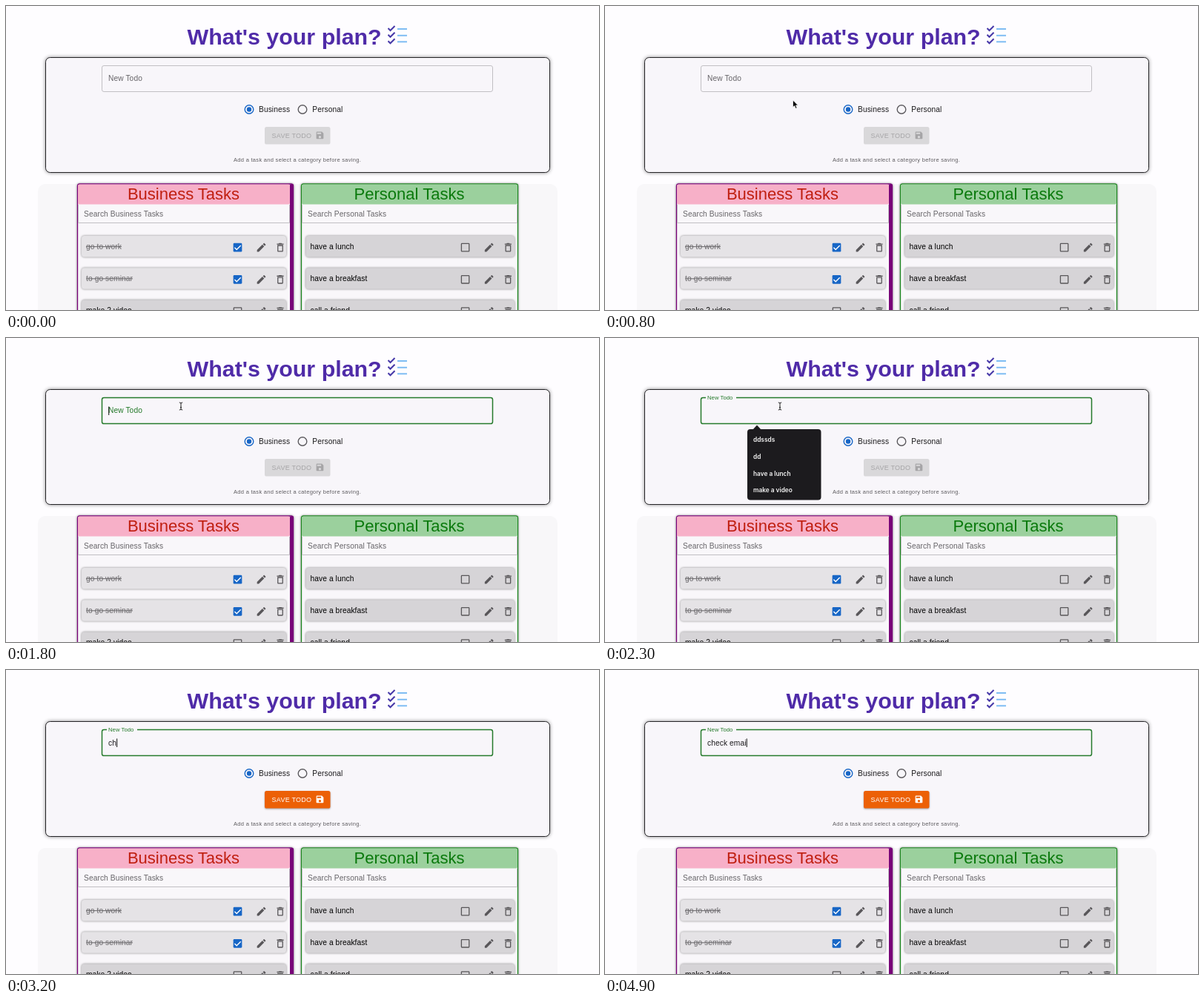
An HTML page for the animation above (5 s loop, 800 px wide and 410 px high).

```html
<!DOCTYPE html>
<html lang="en">
<head>
<meta charset="utf-8">
<title>What's your plan?</title>
<style>
  html, body { margin: 0; width: 100%; height: 100%; overflow: hidden; background: #fefdff; }
  svg { display: block; }
  text { font: 10.2px "Liberation Sans", Arial, sans-serif; letter-spacing: .1px; white-space: pre; }
  .muted { fill: #676569; }
  .title { font-size: 30.4px; font-weight: bold; letter-spacing: 0; fill: #4f2ba8; }
  .heading { font-size: 22px; letter-spacing: 0; text-anchor: middle; }
  .hint { font-size: 7.5px; letter-spacing: .3px; fill: #5f5d61; }
  .button { font-size: 9px; letter-spacing: .25px; }
  .done { fill: #6b696c; text-decoration: line-through; }
  .popup { font: 600 8.3px Inter, sans-serif; letter-spacing: 0; fill: #f4f4f4; }
  .soft { filter: drop-shadow(0 0 2.5px #0007); }
  .card { filter: drop-shadow(0 .6px 1.6px #0007); }
</style>
</head>
<body>
<svg width="800" height="410" viewBox="0 0 800 410">
  <defs>
    <path id="edit" d="M3 17.25V21h3.75L17.81 9.94l-3.75-3.75L3 17.25zM20.71 7.04c.39-.39.39-1.02 0-1.41l-2.34-2.34c-.39-.39-1.02-.39-1.41 0l-1.83 1.83 3.75 3.75 1.83-1.83z"/>
    <path id="bin" d="M6 19c0 1.1.9 2 2 2h8c1.1 0 2-.9 2-2V7H6v12zM8 9h8v10H8V9zm7.5-5l-1-1h-5l-1 1H5v2h14V4z"/>
    <path id="save" d="M17 3H5c-1.11 0-2 .9-2 2v14c0 1.1.89 2 2 2h14c1.1 0 2-.9 2-2V7l-4-4zm-5 16c-1.66 0-3-1.34-3-3s1.34-3 3-3 3 1.34 3 3-1.34 3-3 3zm3-10H5V5h10v4z"/>
    <rect id="empty" x="4" y="4" width="16" height="16" rx="1" fill="none" stroke="#59575a" stroke-width="2"/>
    <g id="checked">
      <rect x="3" y="3" width="18" height="18" rx="2" fill="#1766c6"/>
      <path d="M5.7 12.2l4.3 4.3L18.5 8" fill="none" stroke="#fff" stroke-width="2"/>
    </g>
  </defs>

  <text class="title" x="244.5" y="52">What's your plan?</text>
  <g id="checklist" fill="none" stroke-width="2"></g>

  <rect class="soft" x="53.5" y="69.5" width="680" height="155" rx="6" fill="#f8f6fa" stroke="#252427"/>
  <rect id="field" x="129.5" y="80.5" width="527" height="35" rx="2.6" fill="none"/>
  <rect id="notch" x="136" y="78" height="5" fill="#f8f6fa"/>
  <text id="label">New Todo</text>
  <text id="typed" x="138" y="101.5" fill="#1c1b1d"></text>
  <rect id="caret" y="92.5" width="1" height="11.5" fill="#111"/>

  <g fill="none" stroke-width="1.4">
    <circle cx="328" cy="139.5" r="5.8" stroke="#1766c6"/>
    <circle cx="328" cy="139.5" r="3.2" fill="#1766c6"/>
    <circle cx="400" cy="139.5" r="5.8" stroke="#5d5b5f"/>
  </g>
  <text x="341" y="143" fill="#1c1b1d">Business</text>
  <text x="413.3" y="143" fill="#1c1b1d">Personal</text>

  <rect id="button" x="349" y="163" width="88.5" height="23.5" rx="2.6"/>
  <g id="caption">
    <text class="button" x="358.6" y="178">SAVE TODO</text>
    <use href="#save" transform="translate(417 168) scale(.54)"/>
  </g>
  <text class="hint" x="307" y="210">Add a task and select a category before saving.</text>

  <rect x="43" y="240" width="701" height="190" rx="10" fill="#f8f7f9"/>
  <g id="columns"></g>

  <g id="popup">
    <path d="M199 124l6-6.5 6 6.5z" fill="#1c1b1e"/>
    <rect x="192" y="123" width="99.5" height="95.5" rx="4" fill="#1c1b1e"/>
  </g>
  <path id="arrow" d="M0 0V9.6L2.2 7.6 3.8 11.2 5.5 10.4 3.9 7H6.9Z" fill="#000" stroke="#fff" stroke-width=".7"/>
  <path id="beam" d="M-2.2-5Q0-5 0-3.8Q0-5 2.2-5M0-4V4M-2.2 5Q0 5 0 3.8Q0 5 2.2 5M-1 1.5H1" fill="none" stroke="#222"/>
</svg>

<script>
const LOOP = 5000, STEP = 100;
const FOCUS = 1800, POPUP = 2000, TYPING = 2800;
const KEYS = [2800, 3200, 3400, 3600, 3900, 4000, 4200, 4500, 4700, 4900];
const PHRASE = "check emai";
const PATH = [[100, 24, 382], [600, 225, 165], [800, 253.5, 127], [1100, 252, 122], [1200, 252, 122], [1500, 236, 92]];

const $ = id => document.getElementById(id);
const set = (id, attrs) => { for (const key in attrs) $(id).setAttribute(key, attrs[key]); };
const show = (id, on) => set(id, { visibility: on ? "visible" : "hidden" });
const clamp = v => Math.min(1, Math.max(0, v));
const mix = (a, b, p) => a + (b - a) * p;
const mixColor = (a, b, p) => `rgb(${a.map((v, i) => Math.round(mix(v, b[i], p)))})`;
const icon = (name, cx, cy) => `<use href="#${name}" fill="#59575a" transform="translate(${cx - 7.8} ${cy - 7.8}) scale(.65)"/>`;

function row(x, width, icons, [task, done], i) {
  const y = 310 + i * 43.2;
  return `<rect class="card" x="${x}" y="${y}" width="${width}" height="28.5" rx="4" fill="${done ? "#e5e3e6" : "#d6d4d7"}"/>
    <text class="${done ? "done" : ""}" x="${x + 6}" y="${y + 17.6}">${task}</text>` +
    [done ? "checked" : "empty", "edit", "bin"].map((name, k) => icon(name, icons[k], y + 15.6)).join("");
}

function column({ name, x, width, border, band, ink, edge, cardX, cardWidth, icons, tasks }) {
  const inner = width - edge;
  return `<rect class="card" x="${x + .5}" y="240" width="${width - 1}" height="200" rx="3" fill="#f9f7fa" stroke="${border}" stroke-width="1.3"/>
    <rect x="${x + 1}" y="240.6" width="${inner - 1}" height="27" rx="2" fill="${band}"/>
    <rect x="${x + width - edge}" y="240.5" width="${edge}" height="200" rx="1" fill="${border}"/>
    <text class="heading" x="${x + inner / 2}" y="261" fill="${ink}">${name} Tasks</text>
    <path d="M${x + 1.5} 268V292.5H${x + inner - .5}V268" fill="none" stroke="#c1bfc3"/>
    <text class="muted" x="${x + 9}" y="283.5">Search ${name} Tasks</text>` +
    tasks.map((task, i) => row(cardX, cardWidth, icons, task, i)).join("");
}

$("columns").innerHTML = column({
  name: "Business", x: 96, width: 292, border: "#780078", band: "#f7b0c8", ink: "#c01f10", edge: 5,
  cardX: 102, cardWidth: 276, icons: [312.5, 344.5, 370],
  tasks: [["go to work", true], ["to go seminar", true], ["make 2 video"]]
}) + column({
  name: "Personal", x: 398, width: 293, border: "#1c861f", band: "#9bd09d", ink: "#0a790c", edge: 1,
  cardX: 404.5, cardWidth: 281.5, icons: [619.6, 651.7, 677.4],
  tasks: [["have a lunch"], ["have a breakfast"], ["call a friend"]]
});

$("checklist").innerHTML = [31, 39.8, 48.3].map(y =>
  `<path d="M515.5 ${y - 1}l3 3 6-6" stroke="#4638a8"/><path d="M528 ${y}h13" stroke="#7fbdf3"/>`).join("");

$("popup").innerHTML += ["ddssds", "dd", "have a lunch", "make a video"].map((item, i) =>
  `<text class="popup" x="200" y="${139.7 + i * 22.9}">${item}</text>`).join("");

function pointerAt(t) {
  const next = PATH.findIndex(point => point[0] > t);
  if (next < 0) return PATH.at(-1).slice(1);
  const [t0, x0, y0] = PATH[Math.max(0, next - 1)], [t1, x1, y1] = PATH[next];
  const p = clamp((t - t0) / (t1 - t0));
  return [mix(x0, x1, p), mix(y0, y1, p)];
}

function render(t) {
  const [x, y] = pointerAt(t);
  const overField = y < 116, focused = t >= FOCUS;
  show("arrow", t >= PATH[0][0] && !overField);
  show("beam", overField && t < TYPING);
  for (const id of ["arrow", "beam"]) set(id, { transform: `translate(${x} ${y})` });

  const lift = 1 - (1 - clamp((t - FOCUS) / 200)) ** 3;
  set("field", {
    stroke: focused ? "#257a2b" : overField ? "#29282b" : "#c1bfc3",
    "stroke-width": focused ? 1.5 : 1
  });
  set("notch", { width: 41 * lift });
  set("label", {
    transform: `translate(138 ${mix(101, 82.5, lift)}) scale(${mix(1, .75, lift)})`,
    fill: focused ? "#257a2b" : "#676569"
  });

  $("typed").textContent = PHRASE.slice(0, KEYS.filter(key => key <= t).length);
  set("caret", { x: 138.2 + $("typed").getComputedTextLength() });
  show("caret", t >= TYPING || (focused && t < FOCUS + 500));
  show("popup", t >= POPUP && t < TYPING);

  const p = clamp((t - TYPING) / 250), active = 1 - (1 - p) ** 2 * (1 + 2 * p);
  set("button", {
    fill: mixColor([217, 216, 218], [236, 96, 6], active),
    style: `filter: drop-shadow(0 1px 1px rgba(0,0,0,${.35 * active}))`
  });
  set("caption", { fill: mixColor([166, 165, 167], [255, 255, 255], active) });
}

function tick() {
  render(Math.floor(performance.now() % LOOP / STEP) * STEP);
  requestAnimationFrame(tick);
}
tick();
</script>
</body>
</html>
```
